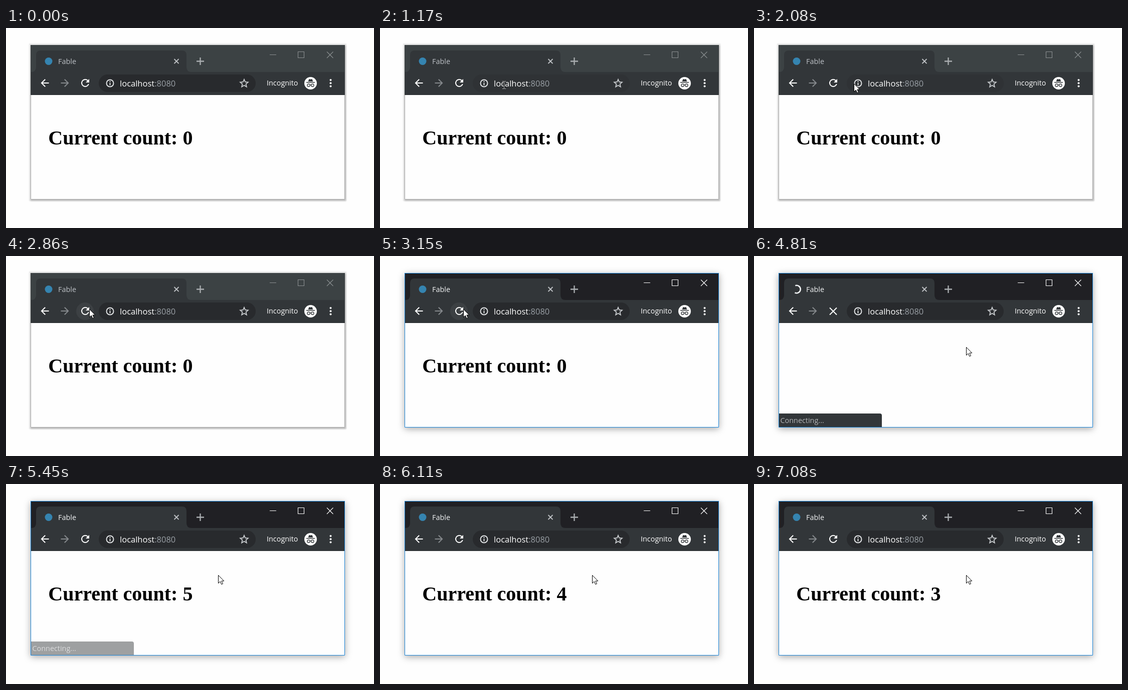
An HTML page for the animation above (8 s loop, 734 by 400 pixels).

```html
<!DOCTYPE html>
<html lang="en">
<head>
<meta charset="utf-8">
<title>Counter demo</title>
<style>
  html, body { margin: 0; width: 100%; height: 100%; overflow: hidden; background: #fefefe; }
  #shadow { position: absolute; left: 49px; top: 34px; width: 627px; height: 309px; }
  svg { position: absolute; left: 0; top: 0; display: block; }
  text { font-family: "Open Sans", "Noto Sans", sans-serif; font-size: 14.4px; white-space: pre; }
  #heading { font: bold 40px "Liberation Serif", "Times New Roman", serif; }
  .line { fill: none; }
</style>
</head>
<body>
<div id="shadow"></div>
<svg width="734" height="400" viewBox="0 0 734 400">
  <!-- window and tab strip -->
  <rect x="50" y="134" width="625" height="208" fill="#fefefe"/>
  <rect id="bar" x="49" y="34" width="627" height="55"/>
  <rect x="49" y="88" width="627" height="46" fill="#323639"/>
  <path d="M50 88Q60 88 60 78V54Q60 45 69 45H351Q360 45 360 54V78Q360 88 370 88Z" fill="#323639"/>
  <path d="M50 133.5H675" stroke="#282b2e"/>
  <path id="topEdge" class="line" d="M49.5 134V34.5H675.5V134"/>
  <path id="edge" class="line" d="M49.5 134V342.5H675.5V134"/>

  <circle id="favicon" cx="85" cy="66.5" r="7.5" fill="#3584b0"/>
  <path id="spinner" class="line" stroke="#f1f3f4" stroke-width="2.6"/>
  <text id="tabTitle" x="104" y="72">Fable</text>
  <path d="M335.5 62l9 9m0-9l-9 9" stroke="#bfc2c5" stroke-width="1.8"/>
  <path d="M380 66.5h15m-7.5-7.5v15" stroke="#a9adb0" stroke-width="2.3"/>
  <path id="controls" class="line" stroke-width="1.1"
    d="M526 53.5h13M582.5 47.5h12v12h-12zM640 47.5l12.5 12.5m0-12.5l-12.5 12.5"/>

  <!-- toolbar -->
  <circle id="ripple" cx="157.5" cy="110.5" r="17.5" fill="#fff"/>
  <path id="back" transform="translate(65.5 98)" fill="#fff"
    d="M20 11H7.83l5.59-5.59L12 4l-8 8 8 8 1.41-1.41L7.83 13H20z"/>
  <use href="#back" style="display:none"/>
  <path transform="translate(129.5 98) scale(-1 1)" fill="#85898c"
    d="M20 11H7.83l5.59-5.59L12 4l-8 8 8 8 1.41-1.41L7.83 13H20z"/>
  <path id="reload" transform="translate(146 98)" fill="#fff"
    d="M17.65 6.35A8 8 0 1 0 19.73 14h-2.08A6 6 0 1 1 12 6c1.66 0 3.14.69 4.22 1.78L13 11h7V4z"/>
  <path id="stop" d="M151 103.5l14 14m0-14l-14 14" stroke="#fff" stroke-width="2"/>
  <rect id="omnibox" x="185" y="93" width="313" height="35" rx="17.5"/>
  <g stroke="#dfe1e3" stroke-width="2" fill="none">
    <circle cx="207.5" cy="110.5" r="7"/>
    <path d="M207.5 109.5v5M207.5 106v2"/>
  </g>
  <text x="227" y="116.7" fill="#fff" style="font-size:16.5px">localhost<tspan fill="#9aa0a6">:8080</tspan></text>
  <polygon id="star" class="line" stroke="#c8cbce" stroke-width="1.8"/>
  <text x="520" y="115" fill="#fff">Incognito</text>
  <circle cx="607.5" cy="110.5" r="12.5" fill="#fff"/>
  <path d="M599 108h17v1.6h-17zM602.7 107l1.8-5 3 .8 3-.8 1.8 5z" fill="#323639"/>
  <g class="line" stroke="#323639" stroke-width="1.3">
    <circle cx="603.6" cy="114.6" r="2.7"/>
    <circle cx="611.4" cy="114.6" r="2.7"/>
    <path d="M606.3 114q1.2-.8 2.4 0"/>
  </g>
  <g fill="#fff">
    <circle cx="647.5" cy="104" r="2"/>
    <circle cx="647.5" cy="110.3" r="2"/>
    <circle cx="647.5" cy="116.6" r="2"/>
  </g>

  <!-- page -->
  <text id="heading" x="84.3" y="233"></text>
  <g id="status">
    <path d="M50 315H251Q255 315 255 319V342H50Z" fill="#323639"/>
    <text x="52.5" y="334" fill="#b4b6b8">Connecting...</text>
  </g>

  <!-- pointers, drawn around their hot spots -->
  <path id="arrow" d="M.5 .5V16.5L4.2 13L6.8 18.7L9.4 17.6L6.9 12H11.8Z" fill="#fff" stroke="#000"/>
  <g id="beam" class="line">
    <path d="M-3.5-7.5h3m1 0h3M0-7V7M-3.5 7.5h3m1 0h3" stroke="#17191b" stroke-width="2.6"/>
    <path d="M-3.5-7.5h3m1 0h3M0-7V7M-3.5 7.5h3m1 0h3" stroke="#d0d2d4"/>
  </g>
</svg>
<script>
const LOOP = 8000;
const FOCUS = 2890, CLICK = 3560, WAIT = 3600, LOAD = 4350, DONE = 5030;

const $ = id => document.getElementById(id);
const set = (id, attrs) => {
  for (const k in attrs) $(id).setAttribute(k, attrs[k]);
};
const show = (id, on) => { $(id).style.display = on ? '' : 'none'; };

// rows of [time, ...values], linear between rows
function track(rows, t) {
  const i = rows.findIndex(r => r[0] > t);
  if (i < 0) return rows[rows.length - 1].slice(1);
  if (i === 0) return rows[0].slice(1);
  const a = rows[i - 1], b = rows[i], k = (t - a[0]) / (b[0] - a[0]);
  return a.slice(1).map((v, j) => v + (b[j + 1] - v) * k);
}

const POINTER = [
  [100, 551, 356], [250, 505, 304], [420, 410, 214], [600, 318, 145],
  [810, 278.5, 121], [910, 275, 119], [1170, 247.5, 114], [1330, 228, 112],
  [1590, 227, 112], [1800, 215, 111], [2370, 183, 110], [2470, 181, 109],
  [2800, 166, 106], [3600, 166, 106], [3700, 215, 118], [3820, 335, 152],
  [3930, 391, 171], [4030, 394, 172], [4330, 423, 182]
];
const RIPPLE = [
  [2560, 0], [2720, .05], [3150, .05], [3350, .13], [3940, .13], [4150, 0]
];
const STATUS = [[4180, 0], [4240, 1], [5270, 1], [5610, 0]];

// angles in degrees, clockwise from 12 o'clock
function arc(from, sweep) {
  const at = deg => {
    const a = deg * Math.PI / 180;
    return (85 + 7.7 * Math.sin(a)).toFixed(2) + ' ' + (66.5 - 7.7 * Math.cos(a)).toFixed(2);
  };
  return `M${at(from)}A7.7 7.7 0 ${sweep > 180 ? 1 : 0} 1 ${at(from + sweep)}`;
}

function spinner(t) {
  if (t < LOAD) {
    const turn = 360 * (t - WAIT) / 1320;
    return arc(-turn, Math.min(turn, 180));
  }
  const dt = t - LOAD, k = Math.min(1, dt / 666);
  return arc(-126 + .23 * dt, 10 + 255 * k * k * (3 - 2 * k) ** 1.2);
}

function drawPointer(t) {
  const [x, y] = track(POINTER, t);
  const inField = x > 185 && x < 498 && y > 93 && y < 128 && t < FOCUS;
  const beam = inField && x > 221;
  show('arrow', t >= 100 && !beam);
  show('beam', beam);
  const px = beam ? Math.floor(x) + .5 : Math.round(x);
  set(beam ? 'beam' : 'arrow', { transform: `translate(${px} ${Math.round(y)})` });
  set('omnibox', { fill: inField ? '#2f3235' : '#282a2d' });
}

function draw(t) {
  const focused = t >= FOCUS;
  set('bar', { fill: focused ? '#202024' : '#3c4244' });
  set('topEdge', { stroke: focused ? '#1883d7' : '#3c4244' });
  set('edge', { stroke: focused ? '#1883d7' : '#aaa' });
  set('controls', { stroke: focused ? '#fff' : '#8b8f91' });
  set('tabTitle', { fill: focused ? '#f1f3f4' : '#bdc1c6' });
  $('shadow').style.boxShadow = focused
    ? '0 3px 13px rgba(0,0,0,.34)'
    : '0 0 2px 3px rgba(0,0,0,.09), 1px 2px 3px 1px rgba(0,0,0,.2)';

  const spinning = t >= WAIT && t < DONE;
  const loading = t >= CLICK && t < DONE;
  show('favicon', !spinning);
  show('spinner', spinning);
  if (spinning) set('spinner', { d: spinner(t) });
  show('reload', !loading);
  show('stop', loading);
  set('ripple', { opacity: track(RIPPLE, t)[0] });
  set('status', { opacity: track(STATUS, t)[0] });

  const count = t < DONE ? 0 : t < 6110 ? 5 : t < 7080 ? 4 : 3;
  $('heading').textContent = 'Current count: ' + count;
  show('heading', t < LOAD || t >= DONE);
  drawPointer(t);
}

set('star', {
  points: Array.from({ length: 10 }, (_, i) => {
    const r = i % 2 ? 3.7 : 8.2, a = i * Math.PI / 5;
    return [475 + r * Math.sin(a), 111 - r * Math.cos(a)].map(v => v.toFixed(2));
  }).join(' ')
});

const begin = performance.now();
function tick() {
  draw((performance.now() - begin) % LOOP);
  requestAnimationFrame(tick);
}
tick();
</script>
</body>
</html>
```
